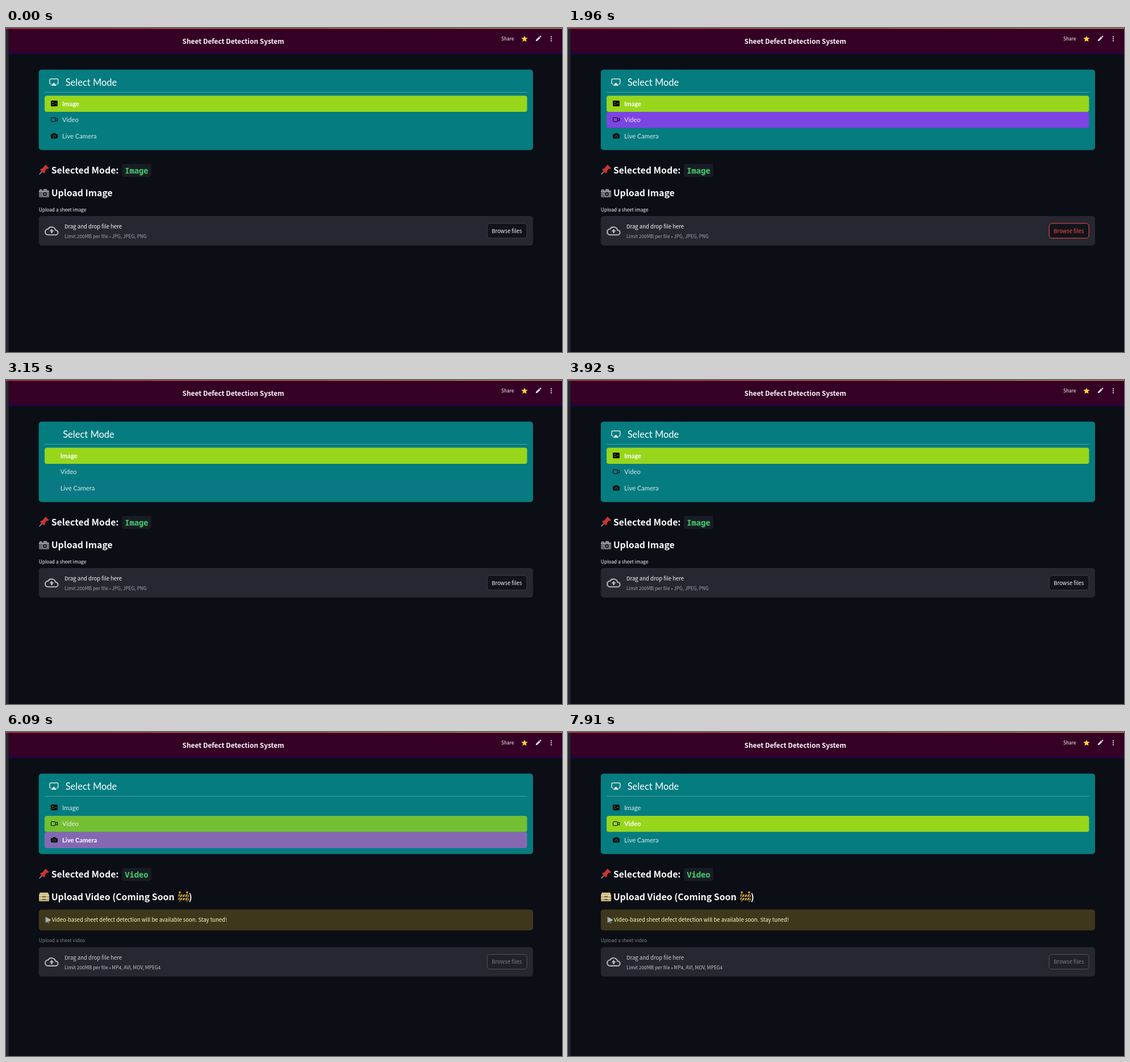
Animation of 979x572 px, one loop 8 s. Source, as an HTML page:

```html
<!DOCTYPE html>
<html lang="en">
<head>
<meta charset="utf-8">
<title>Sheet Defect Detection System</title>
<style>
  html, body { margin: 0; width: 100%; height: 100%; overflow: hidden; background: #0b0e15; }
  svg { display: block; width: 979px; height: 572px; }
  text { font-family: "Noto Sans CJK JP", "Noto Sans CJK SC", "Noto Sans CJK", "Open Sans", sans-serif; font-size: 9.52px; fill: #fafafa; white-space: pre; }
  .title { font-size: 11.9px; font-weight: 700; }
  .heading { font-size: 15.85px; font-weight: 700; }
  .small { font-size: 8.36px; }
  .code { font: 600 13.8px "Noto Sans Mono", "DejaVu Sans Mono", monospace; fill: #3dd56d; }
  .menu text { font-family: Lato, sans-serif; font-size: 11.2px; fill: #fff; }
  .menu .caption { font-size: 16.5px; }
  .line { fill: none; stroke-linecap: round; stroke-linejoin: round; }
</style>
</head>
<body>
<svg viewBox="0 0 979 572">
  <defs>
    <linearGradient id="topLine">
      <stop stop-color="#d8433f"/><stop offset=".5" stop-color="#d9713f"/><stop offset="1" stop-color="#cfa75a"/>
    </linearGradient>
  </defs>
  <rect width="979" height="572" fill="#0b0e15"/>
  <rect width="4.7" height="572" fill="#262730"/>
  <rect x="4.7" width="975" height="44" fill="#360026"/>
  <rect x="4.7" y="44" width="975" height="1.8" fill="#17075f"/>
  <rect width="979" height="1.2" fill="url(#topLine)"/>
  <text class="title" x="310.5" y="27.7">Sheet Defect Detection System</text>
  <text class="small" x="872" y="22.3">Share</text>
  <path fill="#ffd43c" d="M913 13.5l1.6 3.8 4.1.3-3.1 2.7 1 4-3.6-2.1-3.6 2.1 1-4-3.1-2.7 4.1-.3z"/>
  <path fill="#fafafa" d="M933 21l5.6-5.6 2.1 2.1-5.6 5.6H933zM939.3 14.7l.9-.9q.5-.4 1 0l1.1 1.1q.4.5 0 1l-.9.9z"/>
  <g fill="#fafafa"><circle cx="960" cy="15.6" r="1.1"/><circle cx="960" cy="19.1" r="1.1"/><circle cx="960" cy="22.6" r="1.1"/></g>

  <g id="menu" class="menu">
    <rect x="57.7" y="73.5" width="870.3" height="142" rx="5" fill="#047c80"/>
    <path d="M68 113.5H917.5" stroke="#fff" stroke-opacity=".28"/>
    <text id="caption" class="caption" y="101.7">Select Mode</text>
    <g id="rows"></g>
    <g id="icons">
      <path class="line" stroke="#fff" stroke-width="1.2" d="M79.5 99H78.5q-1.5 0-1.5-1.5V91.3q0-1.5 1.5-1.5H90.2q1.5 0 1.5 1.5V97.5q0 1.5-1.5 1.5h-1"/>
      <path fill="#fff" d="M84.3 96.5l5 5.3h-10z"/>
      <rect x="79" y="128.3" width="11.8" height="10" rx="1.4"/>
      <circle cx="82.3" cy="131.3" r="1.1" fill="#8aa850"/>
      <path d="M80 136.5l2.5-2.3 1.6 1.2 2.9-3 3 2" class="line" stroke="#8aa850" stroke-width=".8"/>
      <g class="line" stroke="#000"><rect x="79.4" y="158.3" width="7.8" height="7" rx="1.3"/><path d="M87.3 160.7l3.3-1.5v5.2l-3.3-1.5"/></g>
      <path d="M80.3 187.4h1.5l1.3-1.7h3.6l1.3 1.7h1.5q1.3 0 1.3 1.3v5q0 1.3-1.3 1.3h-9.2q-1.3 0-1.3-1.3v-5q0-1.3 1.3-1.3z"/>
      <circle cx="84.9" cy="190.9" r="2.2" fill="none" stroke="#4b9b96" stroke-width=".9"/>
    </g>
  </g>

  <g id="content">
    <g id="pin">
      <path d="M64.5 252l-5.5 6" stroke="#9aa0a8" stroke-width="1.5" class="line"/>
      <path fill="#d3302f" d="M69.5 241.3l6.3 6-2.3 1.5-1.7-.4-3 3.3.2 3.5-2 1.4-7-6.4 1.5-1.9 3.7.1 3.2-3.3-.4-2z"/>
      <path d="M68.5 244l-4 4.5" stroke="#f2827c" class="line"/>
    </g>
    <text class="heading" x="79.7" y="256.7">Selected Mode:</text>
    <rect x="204" y="240" width="52" height="23" rx="4" fill="#1a1c24"/>
    <text id="modeName" class="code" x="209.2" y="256.7"></text>

    <g id="cameraIcon">
      <rect x="58" y="286.5" width="18" height="12.5" rx="1.5" fill="#666b70"/>
      <path d="M59 286.5v-1.5h4v1.5m3 0v-2h6v2" fill="#aeb2b4"/>
      <path d="M58 288.3h18" stroke="#c8cbcc" stroke-width="1.5" stroke-dasharray="2 1"/>
      <circle cx="68.5" cy="293.3" r="4.5" fill="#25292d" stroke="#a7abae"/>
      <circle cx="68.5" cy="293.3" r="1.8" fill="#59636c"/>
    </g>
    <g id="boxIcon">
      <path d="M59.5 283.5h14.5l2 5H58z" fill="#d8c78d"/>
      <rect x="58" y="287.5" width="18" height="11.5" rx="1" fill="#b9a66e"/>
      <path d="M58 289h18M58 293.5h18" stroke="#f0e6bd" stroke-width="1.5"/>
      <path d="M64 290.5h6M64 295.5h6" stroke="#554c31" stroke-width="1.3"/>
    </g>
    <text id="heading" class="heading" x="79.7" y="297.3"></text>
    <g id="barrier">
      <path d="M306 283v17M319 283v17" stroke="#77736b" stroke-width="1.5"/>
      <path d="M303.5 287h18.5v4h-18.5zm0 6h18.5v4h-18.5z" fill="#e8b322"/>
      <path d="M305 291l2.5-4m2 4l2.5-4m2 4l2.5-4m2 4l2.5-4M305 297l2.5-4m2 4l2.5-4m2 4l2.5-4m2 4l2.5-4" stroke="#272117" stroke-width="1.8"/>
      <circle cx="306" cy="283" r="1.7" fill="#f1a52b"/><circle cx="319" cy="283" r="1.7" fill="#f1a52b"/>
      <text class="heading" x="321.7" y="297.3">)</text>
    </g>

    <g id="alert">
      <rect x="57.7" y="313.5" width="870.3" height="36.7" rx="5" fill="#3e371b"/>
      <path d="M69 326.5l2 .5 7.5 4v2l-6 2.5-3.5 1z" fill="#aeb3b5"/>
      <path d="M69.7 327v9M73 335l1 2h2l-.7-3" class="line" stroke="#6e7376" stroke-width="1.3"/>
      <text x="80.7" y="335.3" style="fill:#ffffc2">Video-based sheet defect detection will be available soon. Stay tuned!</text>
    </g>

    <g id="uploader">
      <text id="label" class="small" x="57.7" y="323.8"></text>
      <rect x="57.7" y="332" width="870.3" height="52" rx="5" fill="#262730"/>
      <g transform="translate(68.1 345.6) scale(1.03)" fill="#b6b7bd">
        <path d="M6 19a5 5 0 0 1-.2-10A7 7 0 0 1 18.600 11a4 4 0 0 1 .4 8z" fill="none" stroke="#b6b7bd" stroke-width="2"/>
        <path d="M8 13h2.550v3h2.900v-3H16l-4-4z"/>
      </g>
      <text id="drop" x="103" y="354.3">Drag and drop file here</text>
      <text id="limit" class="small" x="103" y="371"></text>
      <rect id="button" x="847.2" y="345" width="70" height="26" rx="5"/>
      <text id="browse" x="855.3" y="361.5">Browse files</text>
    </g>
  </g>
</svg>
<script>
const LOOP = 8000, FADE = 150;
const TEAL = [4, 124, 128], PURPLE = [125, 68, 228], LIME = [152, 214, 27];
const $ = id => document.getElementById(id);

const names = ['Image', 'Video', 'Live Camera'];
$('rows').innerHTML = names.map((name, i) => {
  const y = 119.5 + i * 28.5;
  return `<rect x="68" y="${y}" width="849.5" height="28.5" rx="4"/><text y="${y + 18.2}">${name}</text>`;
}).join('');
const rects = [...$('rows').querySelectorAll('rect')];
const labels = [...$('rows').querySelectorAll('text')];

// [start, end] of pointer hover per menu row
const hovers = [
  [],
  [[1800, 2090], [3910, 4980]],
  [[1520, 1730], [2090, 2520], [3130, 3430], [5040, 6440], [7025, 7700]]
];
// [time, row, fade duration]; a reloaded menu returns to its row at once
const selections = [[0, 0, 1], [2230, 2, FADE], [2520, 0, 1], [4390, 1, FADE], [6042, 2, FADE], [6440, 1, 1]];
const reloads = [[2520, 3150], [6440, 7070]];
const ICON_DELAY = 280;

const within = (t, a, b) => t >= a && t < b;
const mix = (a, b, k) => a.map((v, i) => v + (b[i] - v) * k);
function ramp(t, start, duration = FADE) {
  const x = Math.min(1, Math.max(0, (t - start) / duration));
  return x * x * (3 - 2 * x);
}
const show = (id, on) => $(id).style.display = on ? '' : 'none';

function drawMenu(t) {
  const loading = reloads.some(([a, b]) => within(t, a, b));
  const hasIcons = !reloads.some(([a, b]) => within(t, a, b + ICON_DELAY));
  show('menu', !loading);
  show('icons', hasIcons);
  $('caption').setAttribute('x', hasIcons ? 104.7 : 100.2);
  $('content').setAttribute('transform', `translate(0 ${loading ? -142 : 0})`);

  const index = selections.filter(s => s[0] <= t).length - 1;
  const [start, current, duration] = selections[index];
  const previous = index ? selections[index - 1][1] : current;
  const progress = ramp(t, start, duration);

  names.forEach((_, i) => {
    const hover = Math.max(0, ...hovers[i].map(([a, b]) => ramp(t, a) - ramp(t, b)));
    const active = i === current ? (i === previous ? 1 : progress) : i === previous ? 1 - progress : 0;
    rects[i].style.fill = `rgb(${mix(mix(TEAL, PURPLE, hover), LIME, active).map(Math.round)})`;
    labels[i].setAttribute('x', hasIcons ? 99 : 95.7);
    labels[i].style.fontWeight = i === current ? 700 : 400;
    labels[i].style.fillOpacity = i === current ? 1 : .85;
  });
}

function drawContent(t) {
  const video = t >= 4690;
  const focused = within(t, 1190, 2230);
  $('modeName').textContent = video ? 'Video' : 'Image';
  $('heading').textContent = video ? 'Upload Video (Coming Soon' : 'Upload Image';
  $('label').textContent = video ? 'Upload a sheet video' : 'Upload a sheet image';
  $('limit').textContent = 'Limit 200MB per file • ' + (video ? 'MP4, AVI, MOV, MPEG4' : 'JPG, JPEG, PNG');
  show('cameraIcon', !video);
  show('boxIcon', video);
  show('barrier', video);
  show('alert', t >= 4760);
  $('uploader').setAttribute('transform', `translate(0 ${video ? 47.7 : 0})`);
  $('label').style.fill = video ? '#85868b' : '#fafafa';
  $('drop').style.fill = video ? '#cfcfd3' : '#fafafa';
  $('limit').style.fill = video ? '#c4c5c9' : '#a3a4ab';
  $('browse').style.fill = focused ? '#ff4b4b' : video ? '#7d7e84' : '#fafafa';
  $('button').style.fill = video ? '#20222a' : '#11141b';
  $('button').style.stroke = focused ? '#ff4b4b' : video ? '#55565e' : '#41434b';
}

function frame(now) {
  const t = now % LOOP;
  drawMenu(t);
  drawContent(t);
  requestAnimationFrame(frame);
}
frame(0);
</script>
</body>
</html>
```
